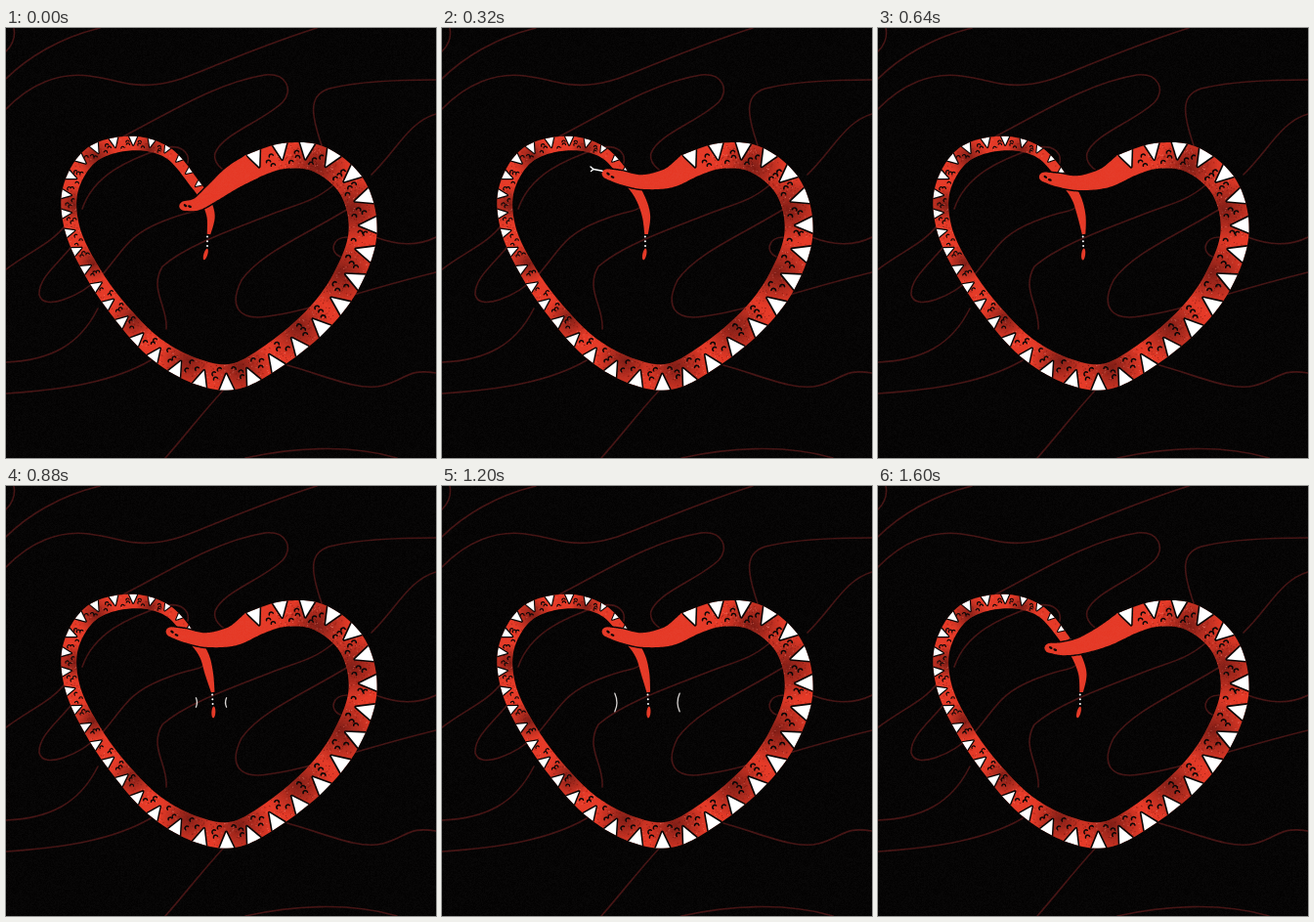
An HTML page with a canvas for the animation above (1.68 s loop, 440 by 440 pixels).

```html
<!DOCTYPE html>
<html>
<head>
<meta charset="utf-8">
<style>
  html, body { margin: 0; width: 100%; height: 100%; overflow: hidden; background: #030202; }
  canvas { display: block; }
</style>
</head>
<body>
<canvas id="stage" width="440" height="440"></canvas>
<script>
const SIZE = 440, LOOP = 1680, STEP = 80;
const RED = '#e53825', INK = '#080404', WHITE = '#fff';
const ctx = document.getElementById('stage').getContext('2d');

const contours = new Path2D(`
  M8 0 C10 10 6 18 0 24 M0 52 C22 30 55 10 96 0
  M0 83 C25 57 55 45 85 49 S125 60 150 58 S195 46 220 36 S280 12 318 0
  M120 111 C165 88 215 56 265 48 C288 46 294 64 283 76 C262 96 222 108 214 128 C211 140 225 148 236 152
  M440 53 C405 53 365 54 335 61 C308 66 312 88 323 120
  M440 88 C412 96 400 125 374 150
  M0 247 C25 228 48 220 62 200 M78 185 C90 150 125 135 160 123 C180 118 188 128 186 138
  M70 220 C55 240 33 255 34 273 C38 290 75 276 98 253 C122 225 125 212 160 198 S195 190 203 183
  M164 308 C166 285 146 268 160 244 C185 222 235 205 268 192 S315 178 336 160
  M350 185 C310 210 260 230 241 258 C228 284 237 300 268 295 C310 290 350 272 440 250
  M349 214 C333 214 331 230 342 234 M378 214 C400 222 420 224 440 214
  M0 342 C45 340 75 325 94 287 M0 374 C60 370 110 362 148 340
  M163 440 C185 415 200 395 222 371
  M288 345 C325 355 360 372 385 366 S410 348 440 353
  M245 440 C290 430 350 425 400 440`);

// Centre lines as x, y, half width
const body = [
  [193,159,5], [166,128,5.5], [129,118,7.3], [88,129.5,8.3], [66,165,8], [68,206,7.8],
  [88,249,8.3], [116,289,9.2], [152,327,11], [194,351,12.7], [234,356.5,13.3],
  [276,334,13.8], [318,299,14.5], [348,259,15], [365,210,14.5], [355,164,14.2],
  [322,135,13.8], [284,131,13], [248,143,13]
];
const headUp = [[252,141.5,13.3], [232,153.5,10.2], [205,157.5,7.3], [183,153,6.8], [170,149.5,5.2]];
const headDown = [[252,141.5,13.3], [232,153,12], [212,168.5,9], [196,180,6.5], [183.5,182,5]];

const mix = (a, b, k) => a + (b - a) * k;
// Half sine wave between two times, zero elsewhere
const pulse = (t, from, to) => t > from && t < to ? Math.sin(Math.PI * (t - from) / (to - from)) : 0;

function randomizer(seed) {
  return () => (seed = (seed * 16807) % 2147483647) / 2147483647;
}

// Catmull-Rom point with its outward normal
function sample(points, u) {
  const last = points.length - 1;
  const i = Math.max(0, Math.min(last - 1, Math.floor(u))), k = u - i;
  const near = [i - 1, i, i + 1, i + 2].map(j => points[Math.max(0, Math.min(last, j))]);
  const [[x, dx], [y, dy], [w]] = [0, 1, 2].map(c => {
    const [a, b, d, e] = near.map(p => p[c]);
    const q = 2*a - 5*b + 4*d - e, r = 3*b - a - 3*d + e;
    return [b + k * (d - a + k * (q + k * r)) / 2, (d - a + k * (2*q + 3*k*r)) / 2];
  });
  const len = Math.hypot(dx, dy) || 1;
  return { x, y, w, nx: -dy / len, ny: dx / len };
}

const offset = (s, out, along = 0) =>
  [s.x + s.nx * out + s.ny * along, s.y + s.ny * out - s.nx * along];

function polygon(points) {
  const path = new Path2D();
  points.forEach(p => path.lineTo(...p));
  path.closePath();
  return path;
}

function ribbon(points) {
  const left = [], right = [];
  for (let u = 0; u <= points.length - 1; u += .0625) {
    const s = sample(points, u);
    left.push(offset(s, s.w));
    right.unshift(offset(s, -s.w));
  }
  return polygon(left.concat(right));
}

// Walks the outer edge from neck to tail; gaps grow with the body width
function placeTeeth(points) {
  const places = [];
  let gap = 0, previous;
  for (let u = points.length - 1.35; u > 2.1; u -= .01) {
    const s = sample(points, u), edge = offset(s, s.w);
    if (previous) gap -= Math.hypot(edge[0] - previous[0], edge[1] - previous[1]);
    if (gap <= 0) {
      places.push(u);
      gap += 8.3 + 1.55 * s.w;
    }
    previous = edge;
  }
  return places;
}

function dot(x, y, rx, ry = rx, turn = 0) {
  ctx.beginPath();
  ctx.ellipse(x, y, rx, ry, turn, 0, 7);
  ctx.fill();
}

function line(...points) {
  ctx.beginPath();
  points.forEach(p => ctx.lineTo(...p));
  ctx.stroke();
}

function drawShading(points, rnd) {
  const last = points.length - 1;
  for (let u = 4.5; u < last - 1; u += 1.45) {
    const s = sample(points, u), [x, y] = offset(s, -s.w * .6), r = s.w * 2.4;
    const glow = ctx.createRadialGradient(x, y, 0, x, y, r);
    glow.addColorStop(0, 'rgba(60,8,8,.6)');
    glow.addColorStop(1, 'rgba(60,8,8,0)');
    ctx.fillStyle = glow;
    ctx.fillRect(x - r, y - r, 2 * r, 2 * r);
  }
  for (let i = 0; i < 900; i++) {
    const s = sample(points, mix(3, last - .8, Math.sqrt(rnd())));
    ctx.fillStyle = i % 3 ? 'rgba(70,6,6,.4)' : 'rgba(255,150,135,.45)';
    ctx.fillRect(...offset(s, s.w * (rnd() * 1.8 - 1)), 1, 1);
  }
}

function drawScales(points, teeth, rnd) {
  ctx.strokeStyle = INK;
  for (let i = 1; i < teeth.length - 3; i++) {
    const middle = (teeth[i - 1] + teeth[i]) / 2;
    for (let j = 0; j < 3; j++) {
      const s = sample(points, middle + (rnd() - .5) * .25);
      const turn = 2.3 + rnd() * 1.2;
      ctx.lineWidth = .7 + s.w * .06;
      ctx.beginPath();
      ctx.arc(...offset(s, s.w * (.2 - j * .38)), 1 + s.w * .09, turn, turn + 3);
      ctx.stroke();
    }
  }
}

function drawTeeth(points, teeth) {
  ctx.fillStyle = WHITE;
  ctx.strokeStyle = INK;
  for (const u of teeth) {
    const s = sample(points, u), half = s.w * .56;
    const tooth = polygon([offset(s, s.w, -half), offset(s, s.w, half), offset(s, -s.w * .25)]);
    ctx.lineWidth = 1.4 + s.w * .13;
    ctx.stroke(tooth);
    ctx.fill(tooth);
  }
}

function drawBody(swing) {
  const tail = [[207.5 + 5 * swing, 211, 1.8], [209.5 - 2 * swing, 192, 4.2], [203, 174, 4.8]];
  const points = tail.concat(body), path = ribbon(points);
  const teeth = placeTeeth(points), rnd = randomizer(77);
  ctx.save();
  ctx.fillStyle = RED;
  ctx.fill(path);
  ctx.clip(path);
  drawShading(points, rnd);
  drawScales(points, teeth, rnd);
  drawTeeth(points, teeth);
  ctx.restore();

  ctx.fillStyle = WHITE;
  for (let i = 0; i < 3; i++) dot(206 + (6 + i * .3) * swing, 213.5 + i * 4.7, 1);
  ctx.fillStyle = RED;
  dot(204.3 + 9.5 * swing, 231.5, 2, 6, .3 * (1 - swing));
}

function drawHead(pose, tongue) {
  const points = headUp.map((p, i) => p.map((v, c) => mix(v, headDown[i][c], pose)));
  const [x, y, r] = points[points.length - 1], path = ribbon(points);
  // Dark rim where the head crosses the tail
  ctx.save();
  ctx.beginPath();
  ctx.rect(0, 0, 225, SIZE);
  ctx.clip();
  ctx.strokeStyle = INK;
  ctx.lineWidth = 3;
  ctx.stroke(path);
  ctx.restore();
  ctx.fillStyle = RED;
  ctx.fill(path);
  dot(x, y, r + 1.3, r, .2 - .3 * pose);

  ctx.fillStyle = INK;
  dot(x, y - .3, 2, 1.2, .6);
  dot(x + 4.5, y + 3 - 2.4 * pose, 2, 1.2, .4);

  if (tongue) {
    const root = [x - 6, y - 3.2], tip = [x - 6 - 9 * tongue, y - 5];
    ctx.strokeStyle = WHITE;
    ctx.lineWidth = 1.4;
    line(root, tip);
    line([tip[0] - 3, tip[1] - 2.5], tip, [tip[0] - 2.5, tip[1] + 2]);
  }
}

function drawWaves(t) {
  const height = 11.3 * pulse(t, 800, 1380);
  if (!height) return;
  const spread = 10.5 + (t - 800) * .052, y = 221.5;
  ctx.strokeStyle = '#d8d4d2';
  ctx.lineWidth = 1.3;
  for (const side of [-1, 1]) {
    const x = 210 + side * spread, end = x + side * height * .2;
    ctx.beginPath();
    ctx.moveTo(end, y - height);
    ctx.quadraticCurveTo(x - side * height * .25, y, end, y + height);
    ctx.stroke();
  }
}

function makeGrain(size) {
  const tile = document.createElement('canvas'), rnd = randomizer(9);
  tile.width = tile.height = size;
  const pen = tile.getContext('2d');
  for (let i = 0; i < size * size; i++) {
    pen.fillStyle = `rgba(255,255,255,${rnd() * .028})`;
    pen.fillRect(i % size, Math.floor(i / size), 1, 1);
  }
  return ctx.createPattern(tile, 'repeat');
}
const grain = makeGrain(128);

function drawGrain(step) {
  const dx = step * 37 % 128, dy = step * 71 % 128;
  ctx.save();
  ctx.translate(-dx, -dy);
  ctx.fillStyle = grain;
  ctx.fillRect(dx, dy, SIZE, SIZE);
  ctx.restore();
}

function draw(elapsed) {
  const step = Math.floor(elapsed % LOOP / STEP), t = step * STEP;
  const fromLoopEnd = Math.min(t, LOOP - t);
  const dip = Math.max(0, 1 - fromLoopEnd / 320) ** 2.4 + .1 * pulse(t, 320, 880);
  const swing = Math.min(t / 1040, (LOOP - t) / 640);

  ctx.fillStyle = '#030202';
  ctx.fillRect(0, 0, SIZE, SIZE);
  ctx.lineCap = ctx.lineJoin = 'round';
  ctx.strokeStyle = '#431212';
  ctx.lineWidth = 1.6;
  ctx.stroke(contours);
  drawBody(swing);
  drawHead(dip, pulse(t, 160, 480));
  drawWaves(t);
  drawGrain(step);
}

let start;
function tick(now) {
  start ??= now;
  draw(now - start);
  requestAnimationFrame(tick);
}
requestAnimationFrame(tick);
</script>
</body>
</html>
```
